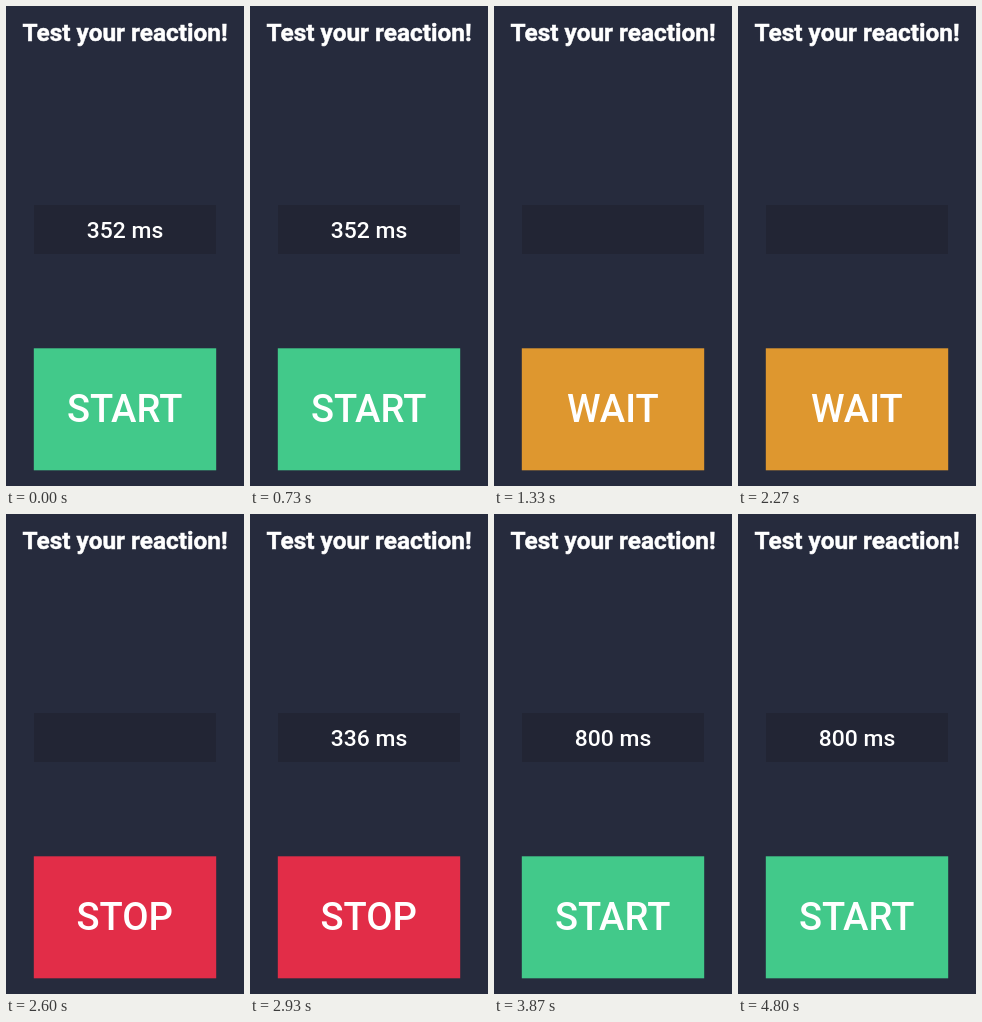
Recreate the animation shown at these times as an HTML page. Size 238 by 480 pixels, loop 5390 ms.

```html
<!DOCTYPE html>
<html lang="en">
<head>
<meta charset="utf-8">
<title>Reaction test</title>
<style>
  html, body { margin: 0; width: 100%; height: 100%; overflow: hidden; background: #262b3d; }
  svg { display: block; width: 100%; height: 100%; }
  text { fill: #fff; font-family: Roboto, sans-serif; font-weight: 500; text-anchor: middle; }
  .title { font-weight: 700; stroke: #fff; stroke-width: .5; }
</style>
</head>
<body>
<svg viewBox="0 0 238 480">
  <rect width="238" height="480" fill="#262b3d"/>
  <text class="title" x="119" y="34.7" font-size="24.4">Test your reaction!</text>
  <rect x="28" y="199" width="182" height="49" fill="#222534"/>
  <text id="counter" x="119" y="231.7" font-size="22.9"></text>
  <rect id="button" x="27.8" y="342.3" width="182.4" height="122"/>
  <text id="label" x="118.8" y="416" font-size="38.2"></text>
</svg>
<script>
  const LOOP = 5390, PRESS = 1070, SIGNAL = 2600, HIT = 3400;
  const STEP = 200 / 3;   // display refresh
  const TICK = 16;        // counter resolution
  const GREEN = "#42c98a", ORANGE = "#de972f", RED = "#e22d48";
  const [counter, button, label] =
    ["counter", "button", "label"].map(id => document.getElementById(id));

  function elapsed(t) {
    const steps = Math.floor((t - SIGNAL + 4) / STEP);
    return TICK * Math.round(steps * STEP / TICK);
  }

  function stateAt(t) {
    if (t < PRESS) return ["START", GREEN, 352];
    if (t < SIGNAL) return ["WAIT", ORANGE, 0];
    if (t < HIT) return ["STOP", RED, elapsed(t)];
    return ["START", GREEN, 800];
  }

  function render(t) {
    const [word, color, ms] = stateAt(t);
    label.textContent = word;
    button.setAttribute("fill", color);
    counter.textContent = ms ? ms + " ms" : "";
  }

  const start = performance.now();
  function frame() {
    render((performance.now() - start) % LOOP);
    requestAnimationFrame(frame);
  }
  frame();
</script>
</body>
</html>
```
